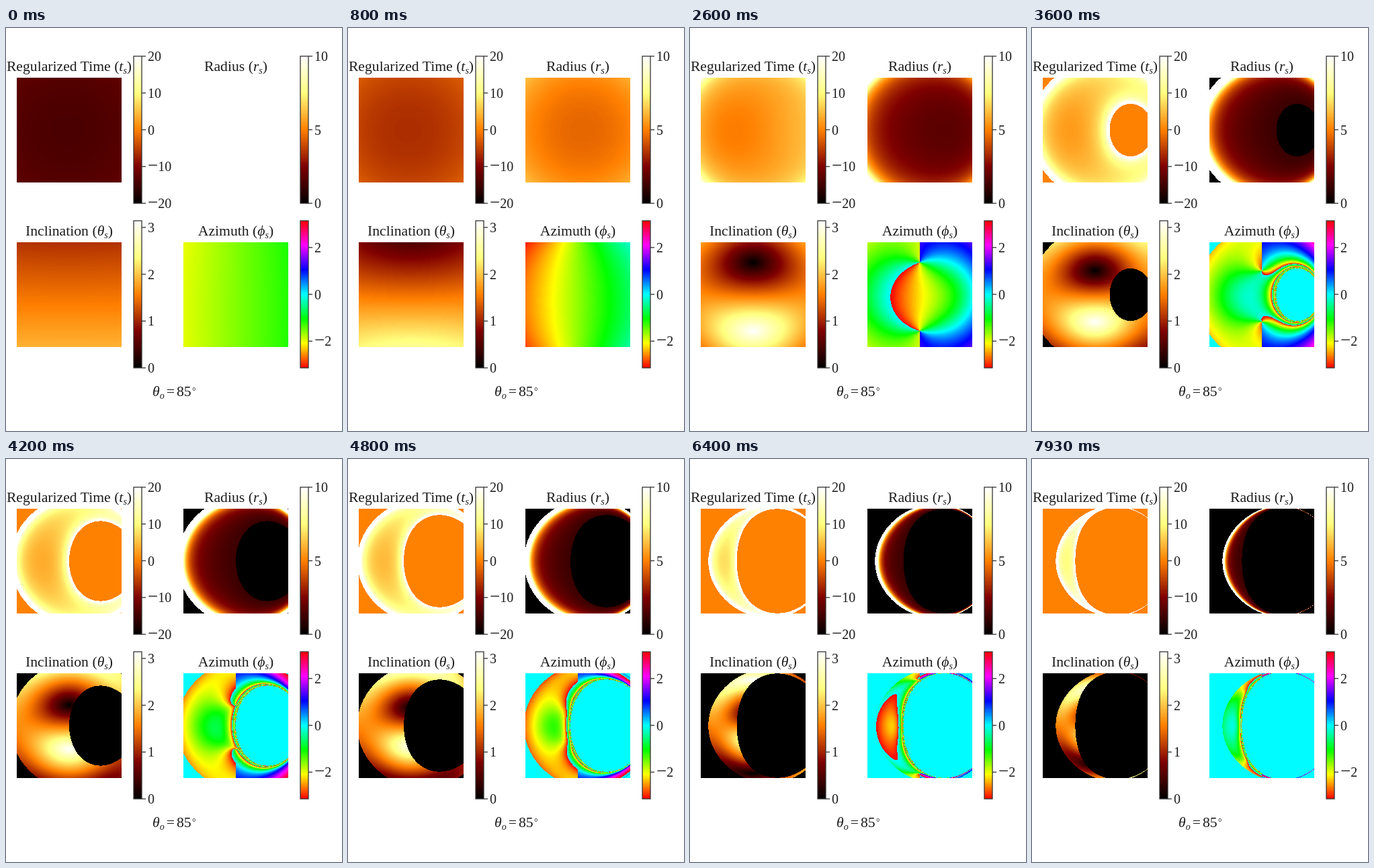
An HTML page with a canvas that plays this animation: 500 px wide and 600 px high, repeating every 8 s.

```html
<!DOCTYPE html>
<html lang="en">
<head>
<meta charset="utf-8">
<title>Light rays around a spinning black hole</title>
<style>
  html, body { margin: 0; width: 100%; height: 100%; overflow: hidden; background: #fff; }
  canvas, svg { position: absolute; left: 0; top: 0; }
  text { font: 21.7px "Liberation Serif", serif; fill: #1c1c1c; }
  .tick { font-size: 20px; }
  .minus { font-size: 27px; }
  .sub { font-size: 14px; font-style: italic; }
  i, .it { font-style: italic; }
</style>
</head>
<body>
<canvas id="stage" width="500" height="600"></canvas>
<svg id="labels" width="500" height="600"></svg>
<script>
const SIZE = 156, HALF_VIEW = 5, FRAMES = 120, DURATION = 8000;
const SPIN = 0.99, A2 = SPIN * SPIN, VIEW_ANGLE = 85 * Math.PI / 180;
const SIN = Math.sin(VIEW_ANGLE), COS = Math.cos(VIEW_ANGLE);
const HORIZON = 1 / (1 + Math.sqrt(1 - A2));   // inverse radius
const START = 0.02, FIRST = 0.1, STEP = 0.01, SUBSTEPS = 2;

const clamp = v => Math.max(0, Math.min(1, v));
const heat = v => [2 * v, 2 * v - 0.5, 2 * v - 1];
const wheel = v => {
  const h = 6 * v;
  return [Math.abs(h - 3) - 1, 2 - Math.abs(h - 2), 2 - Math.abs(h - 4)];
};
const palette = map => Array.from({ length: 256 }, (_, i) =>
  map(i / 255).map(c => Math.round(255 * clamp(c))));
const HEAT = palette(heat), WHEEL = palette(wheel);

const panels = [
  { x: 16, y: 74, title: "Regularized Time", symbol: "t", min: -20, max: 20,
    ticks: [-20, -10, 0, 10, 20], colors: HEAT, value: p => p.t },
  { x: 264, y: 74, title: "Radius", symbol: "r", min: 0, max: 10,
    ticks: [0, 5, 10], colors: HEAT, value: p => 1 / p.u },
  { x: 16, y: 319, title: "Inclination", symbol: "θ", min: 0, max: Math.PI,
    ticks: [0, 1, 2, 3], colors: HEAT, value: p => Math.acos(Math.max(-1, Math.min(1, p.z))) },
  { x: 264, y: 319, title: "Azimuth", symbol: "ϕ", min: -Math.PI, max: Math.PI,
    ticks: [-2, 0, 2], colors: WHEEL, value: p => p.phi % Math.PI }
];
const colorOf = (panel, v) =>
  panel.colors[Math.round(255 * clamp((v - panel.min) / (panel.max - panel.min)))];

// A ray traced back from a distant observer; u = 1/r, (x, y, z) is its direction.
function makeRay(alpha, beta) {
  const lam = -alpha * SIN;
  const eta = (alpha * alpha - A2) * COS * COS + beta * beta;
  const k = A2 - lam * lam - eta;
  const m = 2 * (eta + (lam - SPIN) ** 2);
  const u = START + k * START ** 3 / 6 + m * START ** 4 / 8;
  return {
    lam, k, m, n: -A2 * eta, done: false,
    u, du: 1 + k * START ** 2 / 2 + m * START ** 3 / 2,
    x: SIN, y: 0, z: COS, dx: -COS * beta, dy: alpha, dz: SIN * beta,
    t: -1 / u + 2 * Math.log(u) + (4 + A2 * COS * COS - k / 2) * START,
    phi: -Math.PI / 2
  };
}

const pullU = (p, u) => u * (p.k + u * (1.5 * p.m + 2 * p.n * u));
const delta = u => 1 - 2 * u + A2 * u * u;
const timeRate = (p, u, z) => {
  const q = u * u;
  return (1 + A2 * q) * (1 + (A2 - SPIN * p.lam) * q) / (q * delta(u))
    + SPIN * (p.lam - SPIN * (1 - z * z));
};
const dragRate = (p, u) => SPIN * u * (2 - SPIN * p.lam * u) / delta(u);

// Fourth-order Nyström step in Mino time, Simpson sums for t and phi.
function advance(p, h) {
  const { u, x, y, z, du, dx, dy, dz } = p;
  const h2 = h * h, c = h2 / 8, e = h2 / 2, s = h2 / 6;

  const u1 = pullU(p, u), um = u + h / 2 * du + c * u1;
  const u2 = pullU(p, um), u3 = pullU(p, u + h * du + e * u2);
  p.u = u + h * du + s * (u1 + 2 * u2);
  p.du = du + h / 6 * (u1 + 4 * u2 + u3);
  if (p.u <= 0 || p.u >= HORIZON) { p.done = true; return; }

  const f1 = p.k - 2 * A2 * z * z, g1 = f1 - A2;
  const xm = x + h / 2 * dx + c * g1 * x, ym = y + h / 2 * dy + c * g1 * y;
  const zm = z + h / 2 * dz + c * f1 * z;
  const f2 = p.k - 2 * A2 * zm * zm, g2 = f2 - A2;
  const xe = x + h * dx + e * g2 * xm, ye = y + h * dy + e * g2 * ym;
  const ze = z + h * dz + e * f2 * zm;
  const f3 = p.k - 2 * A2 * ze * ze, g3 = f3 - A2;
  p.x = x + h * dx + s * (g1 * x + 2 * g2 * xm);
  p.y = y + h * dy + s * (g1 * y + 2 * g2 * ym);
  p.z = z + h * dz + s * (f1 * z + 2 * f2 * zm);
  p.dx = dx + h / 6 * (g1 * x + 4 * g2 * xm + g3 * xe);
  p.dy = dy + h / 6 * (g1 * y + 4 * g2 * ym + g3 * ye);
  p.dz = dz + h / 6 * (f1 * z + 4 * f2 * zm + f3 * ze);

  p.t += h / 6 * (timeRate(p, u, z) + 4 * timeRate(p, um, zm) + timeRate(p, p.u, p.z));
  p.phi += Math.atan2(x * p.y - y * p.x, x * p.x + y * p.y)
    - h / 6 * (dragRate(p, u) + 4 * dragRate(p, um) + dragRate(p, p.u));
}

const rays = [];
const coord = i => ((i + 0.5) / SIZE * 2 - 1) * HALF_VIEW;
for (let j = 0; j < SIZE; j++)
  for (let i = 0; i < SIZE; i++) rays.push(makeRay(coord(i), -coord(j)));

function stepRays() {
  for (const p of rays)
    for (let s = 0; s < SUBSTEPS && !p.done; s++) advance(p, STEP / SUBSTEPS);
}

function renderPanel(panel) {
  const image = new ImageData(SIZE, SIZE);
  rays.forEach((p, i) => {
    const [r, g, b] = colorOf(panel, p.done ? 0 : panel.value(p));
    image.data.set([r, g, b, 255], 4 * i);
  });
  return image;
}

const ctx = document.getElementById("stage").getContext("2d");
const BAR_HEIGHT = 219;

function drawBar(panel) {
  const left = panel.x + 174, top = panel.y - 32;
  for (let row = 0; row < BAR_HEIGHT; row++) {
    const v = panel.max - (panel.max - panel.min) * (row + 0.5) / BAR_HEIGHT;
    ctx.fillStyle = `rgb(${colorOf(panel, v)})`;
    ctx.fillRect(left, top + row, 12, 1);
  }
}

function labelMarkup(panel) {
  const left = panel.x + 174, top = panel.y - 32;
  const ticks = panel.ticks.map(v => {
    const y = top + BAR_HEIGHT * (panel.max - v) / (panel.max - panel.min);
    const sign = v < 0 ? '<tspan class="minus">−</tspan>' : "";
    return `<path d="M${left + 12} ${y}h6" stroke="#333" stroke-width="1.3"/>
      <text class="tick" x="${left + 21}" y="${y + 7}">${sign}${Math.abs(v)}</text>`;
  }).join("");
  return `<text x="${panel.x + 78}" y="${panel.y - 10}" text-anchor="middle">${panel.title} (<tspan
    class="it">${panel.symbol}</tspan><tspan class="sub" dy="4">s</tspan><tspan dy="-4">)</tspan></text>
    <rect x="${left}" y="${top}" width="12" height="${BAR_HEIGHT}" fill="none" stroke="#333" stroke-width="1.3"/>${ticks}`;
}

panels.forEach(drawBar);
document.getElementById("labels").innerHTML = panels.map(labelMarkup).join("") +
  `<text x="218" y="548"><tspan class="it">θ</tspan><tspan class="sub" dy="4">o</tspan><tspan
    dx="3" dy="-4">=</tspan><tspan dx="3">85</tspan><tspan class="sub" dx="1" dy="-3">°</tspan></text>`;

for (let i = 0; i < Math.round((FIRST - START) / STEP); i++) stepRays();
const frames = [panels.map(renderPanel)];

function draw() {
  const time = performance.now() % DURATION;
  const index = Math.min(FRAMES - 1, Math.floor((time + 3.4) * FRAMES / DURATION));
  while (frames.length <= index) {
    stepRays();
    frames.push(panels.map(renderPanel));
  }
  panels.forEach((panel, i) => ctx.putImageData(frames[index][i], panel.x, panel.y));
  requestAnimationFrame(draw);
}
draw();
</script>
</body>
</html>
```
